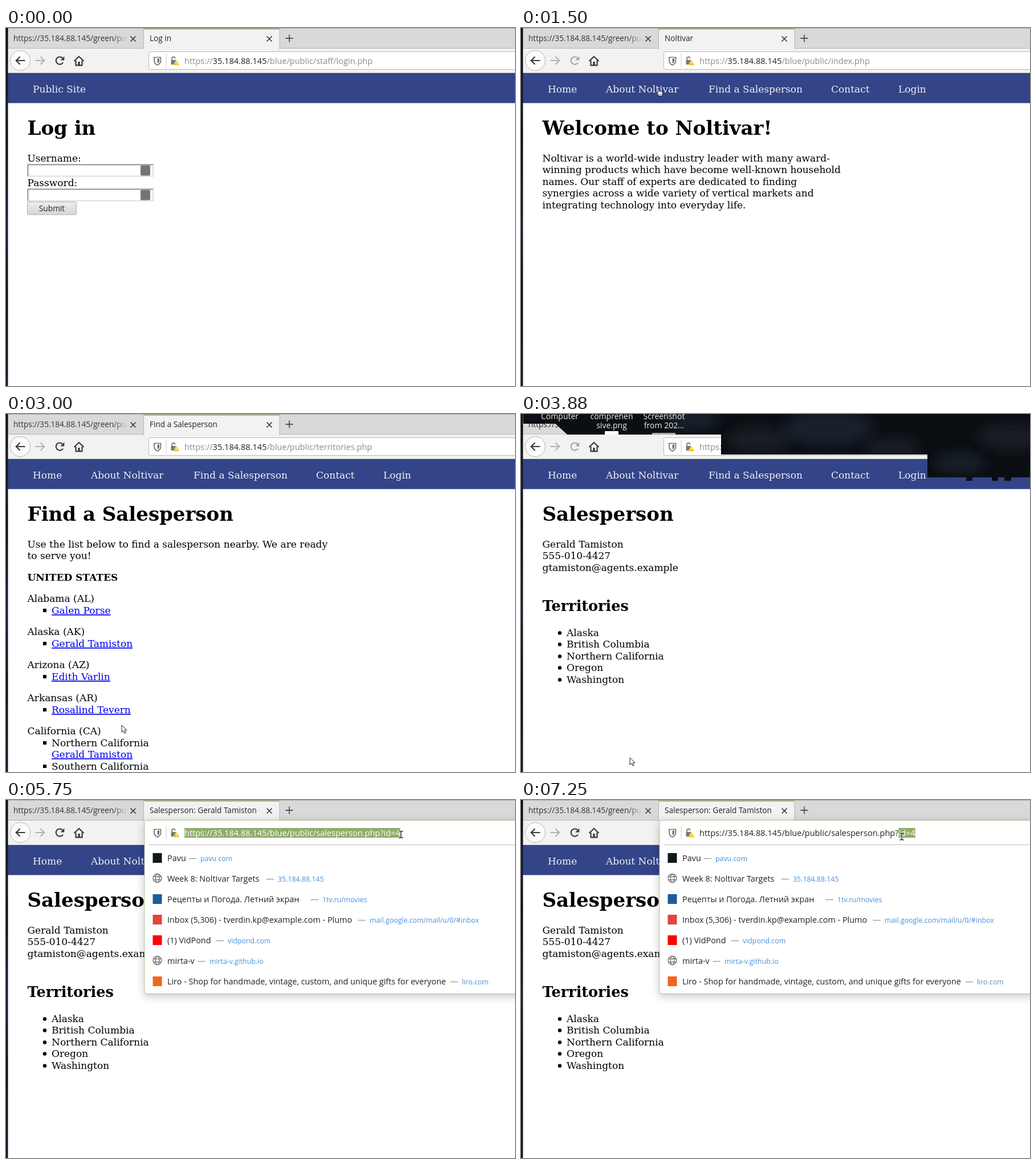
An HTML page for the animation above (8 s loop, 893 by 627 pixels).

```html
<!DOCTYPE html>
<html lang="en">
<head>
<meta charset="utf-8">
<title>Browser session</title>
<style>
html, body { margin: 0; width: 100%; height: 100%; overflow: hidden; background: #fff; }
svg { display: block; }
text { font: 17px "DejaVu Serif", serif; white-space: pre; }
.ui { font-family: "Open Sans", "Noto Sans", sans-serif; fill: #222; }
.h1 { font-size: 34px; font-weight: bold; }
.h2 { font-size: 25.5px; font-weight: bold; }
.b { font-weight: bold; }
.nav { fill: #eef0f6; }
.link { fill: #00e; text-decoration: underline; }
.tab { font-size: 13.6px; }
.url { font-size: 14.55px; }
.row { font-size: 14.4px; }
.addr { font-size: 12.35px; fill: #4a90d9; }
.desk { font-size: 14px; fill: #eee; text-anchor: middle; }
.ico { fill: none; stroke: #3a3a3a; stroke-width: 2.2; }
</style>
</head>
<body>
<svg id="stage" width="893" height="627" viewBox="0 0 893 627"></svg>
<script>
const LOOP = 8000, STEP = 125;
const stage = document.getElementById('stage');
const pen = document.createElement('canvas').getContext('2d');

// Baselines sit on whole pixels.
const text = (x, y, s, cls = '', extra = '') => `<text x="${x}" y="${Math.floor(y)}" class="${cls}" ${extra}>${s}</text>`;
const rect = (x, y, w, h, fill, extra = '') =>
  `<rect x="${x}" y="${y}" width="${w}" height="${h}" fill="${fill}" ${extra}/>`;
const path = (d, extra = 'class="ico"') => `<path d="${d}" ${extra}/>`;
const icon = (d, style) => path(d, `class="ico" style="${style}"`);
const lines = (x, y, list) => list.map((s, i) => text(x, y + i * 20.5, s)).join('');

const defs = `<defs>
<linearGradient id="fade" gradientUnits="userSpaceOnUse" x1="188" x2="213">
  <stop stop-color="#333"/><stop offset="1" stop-color="#d9d9d9"/></linearGradient>
<linearGradient id="edge" x2="0" y2="1">
  <stop stop-color="#0a0c12"/><stop offset=".2" stop-color="#171c2b"/><stop offset=".3" stop-color="#0a0d14"/>
  <stop offset=".55" stop-color="#1a2234"/><stop offset=".75" stop-color="#0c1019"/><stop offset="1" stop-color="#171d2c"/></linearGradient>
<linearGradient id="button" x2="0" y2="1"><stop stop-color="#ededed"/><stop offset="1" stop-color="#d6d6d6"/></linearGradient>
<filter id="shadow" x="-10%" y="-10%" width="120%" height="125%">
  <feDropShadow dx="0" dy="4" stdDeviation="8" flood-opacity=".22"/></filter>
<filter id="blur" x="-60%" y="-60%" width="220%" height="220%"><feGaussianBlur stdDeviation="11"/></filter>
<clipPath id="gap"><path d="M4 0H893V111H860V117H848V111H837V117H826V111H792V117H781V111H713V71H351V36H81L60 17H4Z"/></clipPath>
<clipPath id="scrap"><path d="M4 17H60L81 36H4z"/></clipPath>
</defs>`;

function chrome(title, loading) {
  const close = x => icon(`M${x - 4.5} 14.5l9 9m0 -9l-9 9`, 'stroke-width:1.7');
  return rect(0, 0, 893, 36, '#d9d9d9') + rect(0, 0, 893, 1, '#a9a9a9')
    + rect(0, 35, 893, 1, '#b4b4b4') + rect(0, 36, 893, 43, '#f2f2f2')
    + rect(241, 1, 239.5, 36, '#b4b4b4') + rect(242, 1, 237.5, 36, '#f2f2f2') + rect(242, 1, 237.5, 1.5, '#8fae5c')
    + text(13, 23, 'https://35.184.88.145/green/pu', 'ui tab', 'style="fill:url(#fade)"')
    + text(252, 23, title, 'ui tab') + close(223) + close(462)
    + icon('M490.5 18h13m-6.5 -6.5v13', 'stroke-width:1.8;stroke:#555')
    + rect(0, 78, 893, 1, '#c4c4c4')
    + '<circle cx="25" cy="57" r="17.5" fill="#fbfbfb" stroke="#b5b5b5"/>'
    + path('M33.5 57H18m6.5 -6.7L17.8 57l6.7 6.7')
    + icon('M51.5 57H67m-6.5 -6.7L67.2 57l-6.7 6.7', 'stroke:#b3b3b3')
    + `<g opacity="${loading ? .42 : 1}">` + path('M100 60.5A6.6 6.6 0 1 1 99 52.4')
    + path('M102.3 49.5v7h-7z', 'fill="#3a3a3a"') + '</g>'
    + path('M119.5 58L128 50l8.5 8M122.5 57v8.3h11V57') + rect(126.3, 59, 3.4, 6, '#3a3a3a')
    + rect(250.5, 41.5, 660, 31, '#fff', 'rx="3" stroke="#b9b9b9"');
}

function addressBar(page, open, from, to) {
  const host = '35.184.88.145', full = `https://${host}${page}`;
  let out = icon('M260 51.5q5.5 0 5.5 -1q0 1 6 1v5q0 6 -6 8.5q-5.5 -2.5 -5.5 -8.5z', 'stroke:#666;stroke-width:1.6')
    + path('M265.7 53.5h3.3v3.5q0 3 -3.3 5z', 'fill="#666"')
    + rect(280.5, 45, 1, 24, '#cfcfcf')
    + rect(289.5, 56, 9, 8, '#777', 'rx="1"') + icon('M291 56v-2.5a2.8 2.8 0 0 1 5.6 0', 'stroke:#777;stroke-width:1.7')
    + path('M299 55.5l5.5 10h-11z', 'fill="#ffbf00" stroke="#fff" stroke-width=".6"')
    + rect(298.4, 59, 1.3, 3, '#fff') + rect(298.4, 63, 1.3, 1.2, '#fff');
  if (!open)
    return out + text(313, 63, `https://<tspan fill="#222">${host}</tspan>${page}`, 'ui url', 'style="fill:#8b8b8b"');
  pen.font = '14.55px "Open Sans", "Noto Sans", sans-serif';
  const at = i => 313 + pen.measureText(full.slice(0, i)).width;
  if (to > from) out += rect(at(from), 49, at(to) - at(from), 17, '#8fae6b');
  return out + text(313, 63,
    `${full.slice(0, from)}<tspan fill="#fff">${full.slice(from, to)}</tspan>${full.slice(to)}`, 'ui url');
}

const suggestions = [
  ['Pavu', 'pavu.com', 341, '#10191a'],
  ['Week 8: Noltivar Targets', '35.184.88.145', 477],
  ['Рецепты и Погода. Летний экран', '1tv.ru/movies', 555, '#1c5c9e'],
  ['Inbox (5,306) - tverdin.kp@example.com - Plumo', 'mail.google.com/mail/u/0/#inbox', 638, '#e2453a'],
  ['(1) VidPond', 'vidpond.com', 389, '#f00'],
  ['mirta-v', 'mirta-v.github.io', 357],
  ['Liro - Shop for handmade, vintage, custom, and unique gifts for everyone', 'liro.com', 800, '#f1641e'],
];
const globe = y => `<g fill="none" stroke="#777" stroke-width="1.4"><circle cx="265.5" cy="${y}" r="7.5"/>`
  + `<ellipse cx="265.5" cy="${y}" rx="3.5" ry="7.5"/><path d="M258.5 ${y - 2.7}h14m-14 5.4h14"/></g>`;
const popup = () => rect(243, 35.5, 700, 304, '#fff', 'rx="3" stroke="#b0c39a" filter="url(#shadow)"')
  + rect(251, 78, 642, 1, '#bdbdbd')
  + suggestions.map(([name, addr, x, color], i) => {
    const y = 107 + i * 36;
    return (color ? rect(257.5, y - 14, 16, 17, color) : globe(y - 6))
      + text(283, y, name, 'ui row') + text(x - 21, y, '—', 'ui row', 'style="fill:#888"') + text(x, y, addr, 'ui addr');
  }).join('');

const field = y => rect(37.5, y, 221.5, 22, '#dedede') + path(`M37.5 ${y + 22}v-22h221.5l-2 2h-217.5v18z`, 'fill="#8c8c8c"')
  + rect(39.5, y + 2, 217.5, 18, '#fff') + rect(236, y + 2, 17, 18, '#757575', 'rx="2"');
const bar = items => rect(0, 79, 893, 52.5, '#334488') + items.map(([x, s]) => text(x, 113, s, 'nav')).join('');
const menu = bar([[47, 'Home'], [149, 'About Noltivar'], [329, 'Find a Salesperson'], [544, 'Contact'], [662, 'Login']]);
const heading = s => text(37.5, 187, s, 'h1');

const square = y => rect(65, Math.floor(y) - 9, 6, 6, '#000');
const state = (i, name, seller) => {
  const y = 329.5 + i * 58;
  return text(37.5, y, name) + (seller ? square(y + 20.5) + text(80, y + 20.5, seller, 'link') : '');
};

const pages = {
  login: ['/blue/public/staff/login.php', bar([[47, 'Public Site']]) + heading('Log in')
    + text(37.5, 234, 'Username:') + field(238.5) + text(37.5, 277, 'Password:') + field(281.5)
    + rect(37.5, 304.5, 86, 22.5, 'url(#button)', 'rx="2" stroke="#b0b0b0"')
    + text(80.5, 321, 'Submit', 'ui', 'text-anchor="middle" style="font-size:13.7px"')],
  index: ['/blue/public/index.php', menu + heading('Welcome to Noltivar!') + lines(37.5, 234, [
    'Noltivar is a world-wide industry leader with many award-',
    'winning products which have become well-known household',
    'names. Our staff of experts are dedicated to finding',
    'synergies across a wide variety of vertical markets and',
    'integrating technology into everyday life.'])],
  territories: ['/blue/public/territories.php', menu + heading('Find a Salesperson')
    + lines(37.5, 234, ['Use the list below to find a salesperson nearby. We are ready', 'to serve you!'])
    + text(37.5, 292, 'UNITED STATES', 'b')
    + state(0, 'Alabama (AL)', 'Galen Porse') + state(1, 'Alaska (AK)', 'Gerald Tamiston')
    + state(2, 'Arizona (AZ)', 'Edith Varlin') + state(3, 'Arkansas (AR)', 'Rosalind Tevern')
    + state(4, 'California (CA)') + square(582) + square(623) + text(80, 582, 'Northern California')
    + text(80, 602, 'Gerald Tamiston', 'link') + text(80, 623, 'Southern California')],
  seller: ['/blue/public/salesperson.php?id=4', menu + heading('Salesperson')
    + lines(37.5, 234, ['Gerald Tamiston', '555-010-4427', 'gtamiston@agents.example'])
    + text(37.5, 345, 'Territories', 'h2')
    + lines(80, 389, ['Alaska', 'British Columbia', 'Northern California', 'Oregon', 'Washington'])
    + [0, 1, 2, 3, 4].map(i => `<circle cx="68" cy="${383.5 + Math.floor(i * 20.5)}" r="3.2"/>`).join('')],
};

// The desktop showing through for a moment while the window repaints.
function desktop() {
  const blobs = [[420, 45, 60], [540, 25, 80], [650, 60, 50], [770, 85, 45], [860, 40, 60], [300, 10, 50]];
  return '<g clip-path="url(#gap)">' + rect(0, 0, 893, 120, '#0b0e12')
    + blobs.map(([x, y, r], i) => `<ellipse cx="${x}" cy="${y}" rx="${r}" ry="${r / 2.5}" `
      + `fill="${i % 2 ? '#1d2735' : '#1a222b'}" opacity=".8" filter="url(#blur)"/>`).join('')
    + rect(147, 30, 24, 6, '#fff') + rect(230, 33, 41, 3, '#aaa')
    + text(68, 9, 'Computer', 'ui desk') + text(159, 9, 'comprehen', 'ui desk') + text(159, 25, 'sive.png', 'ui desk')
    + text(251, 9, 'Screenshot', 'ui desk') + text(251, 25, 'from 202…', 'ui desk') + '</g>'
    + '<g clip-path="url(#scrap)">' + rect(4, 17, 80, 18.5, '#d9d9d9') + text(13, 23, 'https://3', 'ui tab') + '</g>';
}

const outlined = 'fill="#fff" stroke="#222"';
const beam = 'M-3.5 -6q3 0 3.5 1.5q.5 -1.5 3.5 -1.5M0 -5v10M-3.5 6q3 0 3.5 -1.5q.5 1.5 3.5 1.5';
const shapes = {
  arrow: path('M0 0v12.5l3 -2.8l2.2 4.8l2 -1l-2.2 -4.6h4.2z', outlined),
  hand: path('M2.5 7V1.3q1 -1.6 2 0V5q3 -.6 6 1.3v3.5l-1.3 3.2H4L.5 8.5q.3 -1.6 2 -.5z', outlined)
    + path('M4.5 9v2m2 -2v2m2 -2v2', 'stroke="#222" stroke-width=".7"'),
  beam: icon(beam, 'stroke:#fff;stroke-width:2.6') + icon(beam, 'stroke:#222;stroke-width:1.3'),
};

// Pointer stops: time, x, y, shape; each holds until the next.
const stops = [
  [125, 79, 128, 'arrow'], [250, 82, 120, 'hand'], [375, 85, 113, 'hand'], [500, 86, 109, 'hand'],
  [1125, 98, 109, 'hand'], [1250, 140, 108, 'hand'], [1375, 195, 107, 'hand'], [1500, 238, 106, 'hand'],
  [1625, 275, 105, 'hand'], [1750, 355, 104, 'hand'], [1875, 432, 104, 'hand'],
  [2375, 425, 125, 'arrow'], [2500, 385, 220, 'arrow'], [2625, 325, 340, 'arrow'], [2750, 265, 450, 'arrow'],
  [2875, 226, 515, 'arrow'], [3000, 203, 545, 'arrow'], [3375, 191, 602, 'arrow'],
  [4375, 205, 545, 'arrow'], [4500, 240, 412, 'arrow'], [4750, 430, 255, 'arrow'], [4875, 540, 150, 'arrow'],
  [5250, 613, 60.5, 'beam'], [5500, 693, 60.5, 'beam'], [6250, 703, 59, 'beam'], [6375, 710, 58, 'beam'],
  [6625, 699, 58, 'beam'], [7125, 680, 62, 'beam'], [7250, 668, 64, 'beam'],
];
const pointer = t => {
  const stop = stops.filter(s => s[0] <= t).pop();
  return stop ? `<g transform="translate(${stop[1]} ${stop[2]})">${shapes[stop[3]]}</g>` : '';
};

function render(t) {
  const within = (a, b) => t >= a && t < b;
  const [addr, body] = pages[t < 1000 ? 'login' : t < 2250 ? 'index' : t < 3750 ? 'territories' : 'seller'];
  const title = t < 1000 ? 'Log in' : t < 2250 ? 'Noltivar' : t < 4375 ? 'Find a Salesperson' : 'Salesperson: Gerald Tamiston';
  const loading = within(875, 1750) || within(2125, 3000) || within(3750, 4375);
  const open = t >= 5750, end = 21 + addr.length;
  const from = t < 6250 ? 0 : t < 7125 ? end : t < 7250 ? end - 2 : end - 4;
  stage.innerHTML = defs + rect(0, 0, 893, 627, '#fff') + chrome(title, loading) + body
    + (open ? popup() : '') + addressBar(addr, open, from, end)
    + (within(3875, 4000) ? desktop() : '') + rect(0, 0, 3.5, 627, 'url(#edge)') + pointer(t);
}

let shown = -1;
function tick() {
  const step = Math.floor(performance.now() % LOOP / STEP);
  if (step !== shown) render((shown = step) * STEP);
  requestAnimationFrame(tick);
}
tick();
</script>
</body>
</html>
```
